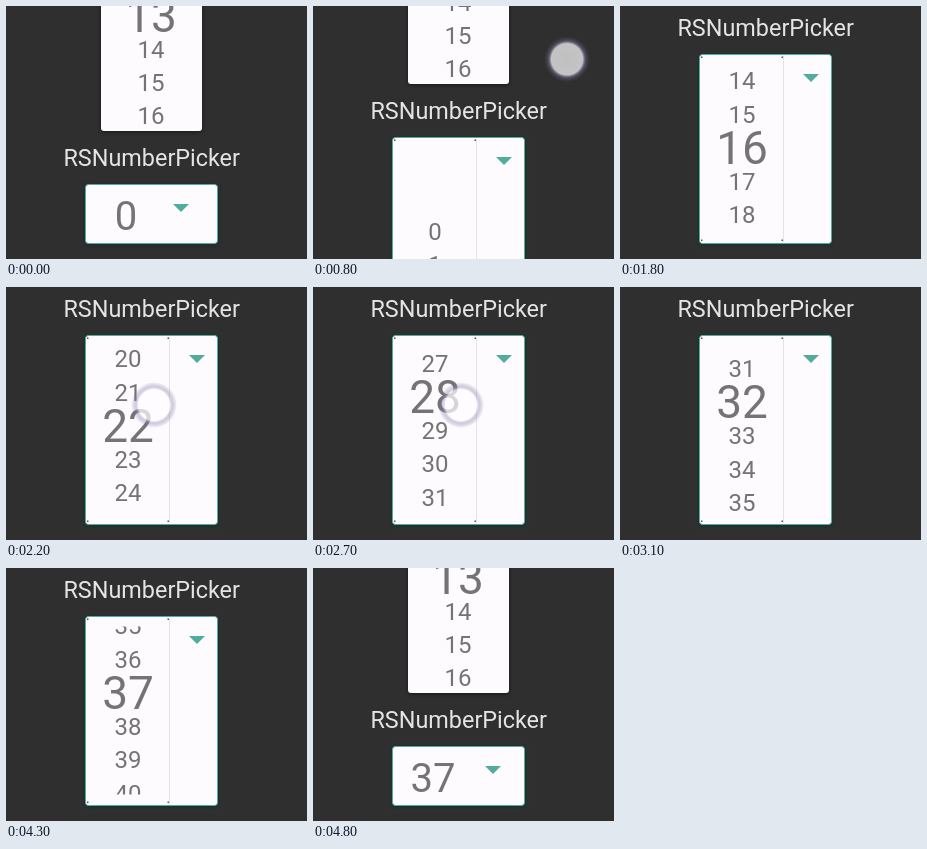
An HTML page with a canvas for the animation above (5000 ms loop, 301x253 px).

```html
<!DOCTYPE html>
<html lang="en">
<head>
<meta charset="utf-8">
<title>Number picker</title>
<style>
html, body { margin: 0; width: 100%; height: 100%; overflow: hidden; background: #2f2f2f; }
canvas { display: block; filter: blur(.4px); }
</style>
</head>
<body>
<canvas id="stage" width="301" height="253"></canvas>
<script>
const ctx = document.getElementById('stage').getContext('2d');
const LOOP = 5000, STEP = 100, ROW = 33.5;
const OPEN_AT = 500, CLOSE_AT = 4600;
const DARK = '#2f2f2f', WHITE = '#fdfbfe', TEAL = '#52ab9c', GREY = '#747476';

// A gesture scrolls by a distance with an ease-out; its touch runs from one y to another
const gesture = (start, distance, options) =>
  ({ start, distance, time: 500, drag: 200, x: 148, from: 215, to: 21, ...options });
const tap = (start, x, y) => gesture(start, 0, { drag: 100, x, from: y, to: y });

const pageSwipe = gesture(610, 130, { time: 800, drag: 390, x: 254, from: 100, to: 4 });
const listSwipes = [
  gesture(1500, 663),
  gesture(2100, 250),
  gesture(2600, 186),
  gesture(3200, 289.5),
  gesture(3700, -131.5, { time: 400, drag: 400, x: 153, from: 54, to: 185 })
];
const touches = [tap(300, 178, 205), pageSwipe, ...listSwipes, tap(4400, 191, 72)];

const clamp = k => Math.min(1, Math.max(0, k));
const scrolled = (g, t) => g.distance * Math.sin(clamp((t - g.start) / g.time) * Math.PI / 2);

function text(str, x, y, size, color = GREY) {
  ctx.font = `${size}px Roboto, sans-serif`;
  ctx.textAlign = 'center';
  ctx.fillStyle = color;
  ctx.fillText(str, x, y + size * .356);
}

function box(x, y, w, h, border) {
  ctx.save();
  ctx.beginPath();
  ctx.roundRect(x, y, w, h, 3);
  ctx.shadowColor = border ? 'rgba(0,50,44,.8)' : 'rgba(0,0,0,.5)';
  ctx.shadowBlur = 4;
  ctx.shadowOffsetY = 1;
  ctx.fillStyle = WHITE;
  ctx.fill();
  ctx.restore();
  if (!border) return;
  ctx.strokeStyle = border;
  ctx.lineWidth = 1;
  ctx.stroke();
}

function clipped(x, y, w, h, paint) {
  ctx.save();
  ctx.beginPath();
  ctx.rect(x, y, w, h);
  ctx.clip();
  paint();
  ctx.restore();
}

function arrow(x, y) {
  ctx.beginPath();
  ctx.moveTo(x - 8, y - 4);
  ctx.lineTo(x + 8, y - 4);
  ctx.lineTo(x, y + 4);
  ctx.fillStyle = TEAL;
  ctx.fill();
}

function upperPicker() {
  box(95, -20, 101, 145);
  clipped(95, -20, 101, 138, () => {
    text(13, 145, 10, 46);
    for (let i = 0; i < 3; i++) text(14 + i, 145, 43 + i * 33, 24);
  });
}

function closedBox(value) {
  box(79.5, 178.5, 132, 59, TEAL);
  text(value, 120, 210, 40);
  arrow(value > 9 ? 180 : 175, 202);
}

function openBox(scroll) {
  box(79.5, 178.5, 132, 189, TEAL);
  ctx.fillStyle = '#e6e2e9';
  ctx.fillRect(163, 180, 1, 186);
  ctx.fillStyle = '#555';
  for (const x of [81, 161.5]) for (const y of [180.5, 363.5]) ctx.fillRect(x, y, 1.5, 1.5);
  arrow(191, 202);

  const current = Math.floor(scroll / ROW);
  clipped(80, 188.5, 83, 168, () => {
    for (let n = Math.max(0, current - 3); n < current + 5; n++) {
      const big = scroll > 0 && n === current;
      text(n, 122, 272 + n * ROW - scroll, big ? 46 : 24);
    }
  });
}

function touchDot(x, y) {
  const glow = ctx.createRadialGradient(x, y, 0, x, y, 23);
  glow.addColorStop(0, 'rgba(255,253,255,.7)');
  glow.addColorStop(.68, 'rgba(255,253,255,.72)');
  glow.addColorStop(.8, 'rgba(140,130,175,.4)');
  glow.addColorStop(1, 'rgba(90,80,120,0)');
  ctx.beginPath();
  ctx.arc(x, y, 23, 0, 7);
  ctx.fillStyle = glow;
  ctx.fill();
}

function draw(t) {
  const open = t >= OPEN_AT && t < CLOSE_AT;
  ctx.fillStyle = DARK;
  ctx.fillRect(0, 0, 301, 253);

  ctx.save();
  ctx.translate(0, open ? -Math.round(scrolled(pageSwipe, t)) : 0);
  upperPicker();
  text('RSNumberPicker', 145.7, 152, 23.4, '#e4e4e4');
  if (open) openBox(listSwipes.reduce((sum, g) => sum + scrolled(g, t), 0));
  else closedBox(t < OPEN_AT ? 0 : 37);
  ctx.restore();

  for (const g of touches) {
    const k = (t - g.start) / g.drag;
    if (k >= 0 && k <= 1) touchDot(g.x, g.from + (g.to - g.from) * k);
  }
}

const start = performance.now();
function tick() {
  const t = (performance.now() - start) % LOOP;
  draw(Math.floor(t / STEP) * STEP);
  requestAnimationFrame(tick);
}
tick();
</script>
</body>
</html>
```
